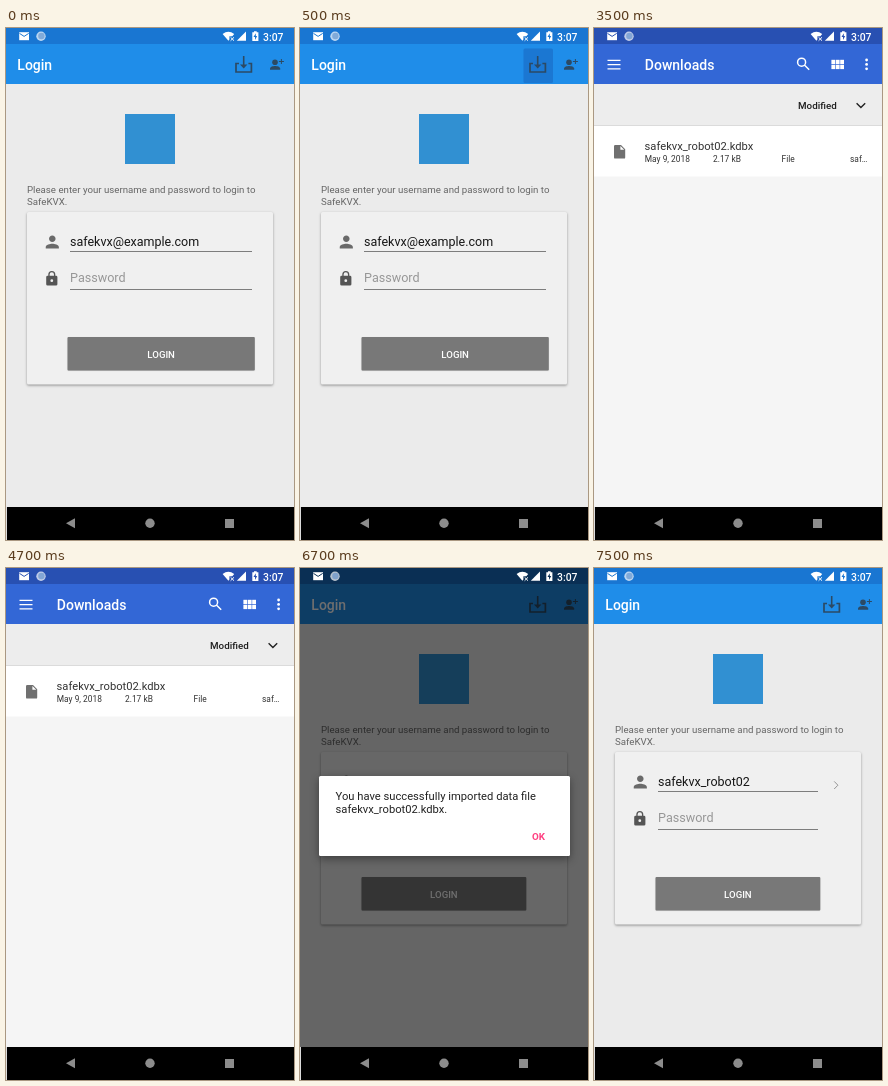
Recreate the animation shown at these times as an HTML page with a canvas. Size 288 by 512 pixels, loop 8 s.

```html
<!DOCTYPE html>
<html lang="en">
<head>
<meta charset="utf-8">
<title>Import a data file</title>
<style>
html, body { margin: 0; width: 100%; height: 100%; overflow: hidden; background: #000; }
canvas { display: block; width: 288px; height: 512px; }
</style>
</head>
<body>
<canvas id="stage"></canvas>
<script>
const W = 288, H = 512, PAGE_END = 479, LOOP = 8000;
const canvas = document.getElementById('stage');
const ctx = canvas.getContext('2d');
const ratio = window.devicePixelRatio || 1;
canvas.width = W * ratio;
canvas.height = H * ratio;

const APP = 'SafeKVX';
const EMAIL = 'safekvx@example.com';
const PROFILE = 'safekvx_robot02';
const FILE = PROFILE + '.kdbx';
const ACTION = '#2c4a64';

const PERSON = 'M12 12c2.21 0 4-1.79 4-4s-1.79-4-4-4-4 1.79-4 4 1.79 4 4 4z' +
  'm0 2c-2.67 0-8 1.34-8 4v2h16v-2c0-2.66-5.33-4-8-4z';
const LOCK = 'M18 8h-1V6a5 5 0 0 0-10 0v2H6a2 2 0 0 0-2 2v10a2 2 0 0 0 2 2h12a2 2 0 0 0 2-2V10a2 2 0 0 0-2-2z' +
  'M12 17a2 2 0 1 1 0-4 2 2 0 0 1 0 4zM15.1 8H8.9V6a3.1 3.1 0 0 1 6.2 0z';

function rect(x, y, w, h, color) {
  ctx.fillStyle = color;
  ctx.fillRect(x, y, w, h);
}

function roundRect(x, y, w, h, r, color) {
  ctx.fillStyle = color;
  ctx.beginPath();
  ctx.roundRect(x, y, w, h, r);
  ctx.fill();
}

function circle(x, y, r, color) {
  ctx.fillStyle = color;
  ctx.beginPath();
  ctx.arc(x, y, r, 0, Math.PI * 2);
  ctx.fill();
}

function fill(path, color) {
  ctx.fillStyle = color;
  ctx.fill(new Path2D(path), 'evenodd');
}

function line(path, color, width) {
  ctx.strokeStyle = color;
  ctx.lineWidth = width;
  ctx.stroke(new Path2D(path));
}

function icon(path, x, y, scale, color) {
  ctx.save();
  ctx.translate(x, y);
  ctx.scale(scale, scale);
  ctx.translate(-12, -12);
  fill(path, color);
  ctx.restore();
}

function text(str, x, y, size, color, weight = 400, align = 'left') {
  ctx.font = `${weight} ${size}px Roboto, sans-serif`;
  ctx.textAlign = align;
  ctx.fillStyle = color;
  ctx.fillText(str, x, y);
}

function shadowed(blur, dy, alpha, draw) {
  ctx.save();
  ctx.shadowColor = `rgba(0,0,0,${alpha})`;
  ctx.shadowBlur = blur * ratio;
  ctx.shadowOffsetY = dy * ratio;
  draw();
  ctx.restore();
}

function statusIcons(barColor) {
  const white = '#fff';
  fill('M13.2 4.2H23V12.2H13.2Z', white);
  line('M13.5 5.4L18.1 8.4L22.7 5.4', barColor, 1);
  circle(35, 8.3, 4.7, 'rgba(255,255,255,.7)');
  circle(35.4, 8, 3.2, 'rgba(90,140,200,.6)');
  fill('M216.6 6Q222.4 1.6 228.2 6L226.3 8.2H223.4V11.6L222.4 12.8Z', white);
  line('M224.6 9.3L228 12.7M228 9.3L224.6 12.7', white, 1);
  fill('M240 3.6V12.7H230.8Z', white);
  fill('M246.3 4.3H248V3.2H250.7V4.3H252.4V13H246.3Z', white);
  fill('M249.8 5.3L247.5 9H249V12L251.2 8.1H249.8Z', barColor);
  text('3:07', 257, 12.5, 10.4, white, 500);
}

function navigation() {
  const gray = '#8c8c8c';
  rect(0, PAGE_END, W, H - PAGE_END, '#000');
  rect(0, PAGE_END, 1, H - PAGE_END, '#dcdcdc');
  fill('M69 490.2V500.2L60 495.2Z', gray);
  circle(144, 495.2, 4.7, gray);
  rect(219, 491, 9, 9, gray);
}

function importIcon() {
  line('M233 35.5H230V44H245.4V35.5H242.4', ACTION, 1.7);
  line('M237.7 28V39', ACTION, 1.6);
  fill('M234 36.6H241.4L237.7 40.6Z', ACTION);
}

function addUserIcon() {
  circle(269, 34.2, 2.8, ACTION);
  fill('M264 41.8V40.6C264 38.8 267 38 269.1 38S274.2 38.8 274.2 40.6V41.8Z', ACTION);
  line('M275.4 31V36M272.9 33.5H277.9', ACTION, 1);
}

function loginScreen({ user, pressed = false, imported = false }) {
  const right = imported ? 224 : 246;
  const buttonRight = imported ? 226.3 : 248.8;

  rect(0, 0, W, PAGE_END, '#ebebeb');
  rect(0, 0, W, 16, '#1976d2');
  rect(0, 16, W, 40, '#1f8de9');
  if (pressed) roundRect(223.5, 20.5, 29.5, 34.5, 1.5, '#1b77d2');
  text('Login', 11.3, 42, 14, '#fff', 500);
  importIcon();
  addUserIcon();

  rect(119, 86, 50, 50, '#3190d2');
  text('Please enter your username and password to login to', 21, 165.2, 9.7, '#666');
  text(APP + '.', 21, 176.7, 9.7, '#666');

  shadowed(2.5, 1, 0.4, () => roundRect(21, 184, 246, 172.5, 1.5, '#f0f0f0'));
  icon(PERSON, 46.3, 214, 0.82, '#6a6a6a');
  icon(LOCK, 45.8, 250.6, 0.7, '#555');
  text(user, 64, 218, 12.5, '#161616');
  text('Password', 64, 254, 12.6, '#979797');
  rect(64, 223, right - 64, 1, '#7d7d7d');
  rect(64, 261, right - 64, 1, '#7d7d7d');
  if (imported) line('M240.2 213.4L243.9 217.2L240.2 221', '#8a8a8a', 0.9);

  shadowed(1, 0.4, 0.15, () => roundRect(61.5, 309, buttonRight - 61.5, 33.5, 1, '#787878'));
  text('LOGIN', (61.5 + buttonRight) / 2, 329.5, 9.6, '#fff', 500, 'center');
  statusIcons('#1976d2');
}

function downloadsScreen() {
  const white = '#fff';
  rect(0, 0, W, PAGE_END, '#f5f5f5');
  rect(0, 0, W, 16, '#2850b2');
  rect(0, 16, W, 40, '#3367d6');
  line('M13.5 32.4H26.5M13.5 36.6H26.5M13.5 40.8H26.5', white, 1.3);
  text('Downloads', 50.8, 42, 14, white, 500);
  line('M211.6 34.2A4 4 0 1 1 203.6 34.2A4 4 0 1 1 211.6 34.2M210.4 37L215.2 41.8', white, 1.5);
  for (let i = 0; i < 6; i++) {
    rect(237.4 + (i % 3) * 4.4, 31.8 + Math.floor(i / 3) * 5, 3.8, 4.3, white);
  }
  for (let i = 0; i < 3; i++) circle(272.6, 32 + i * 4.4, 1.4, white);

  rect(0, 56, W, 41.5, '#ededed');
  rect(0, 97, W, 0.8, '#d6d6d6');
  text('Modified', 204, 81, 9.8, '#202020', 500);
  line('M262.6 75.2L266.9 79.5L271.2 75.2', '#222', 1.4);

  rect(0, 98, W, 50.5, white);
  fill('M21.2 117H27L31.2 121.2V129.4Q31.2 130.6 30 130.6H21.2Q20 130.6 20 129.4V118.2Q20 117 21.2 117ZM26.4 118V121.8H30.2Z', '#707070');
  text(FILE, 50.6, 122, 11.2, '#333');
  text('May 9, 2018', 50.8, 134.4, 8.4, '#333');
  text('2.17 kB', 119, 134.4, 8.4, '#333');
  text('File', 187.6, 134.4, 8.4, '#333');
  text(FILE.slice(0, 3) + '…', 256, 134.4, 8.4, '#333');
  statusIcons('#2850b2');
}

function importedDialog() {
  loginScreen({ user: PROFILE, imported: true });
  rect(0, 0, W, PAGE_END, 'rgba(0,0,0,.57)');
  rect(0, 0, W, 16, '#0a2f54');
  statusIcons('#0a2f54');
  shadowed(8, 3, 0.4, () => roundRect(19, 208, 251, 80, 1.5, '#fff'));
  text('You have successfully imported data file', 35.6, 232, 11.2, '#222');
  text(FILE + '.', 35.6, 245, 11.2, '#222');
  text('OK', 232, 271.7, 9.8, '#ff4081', 700);
}

const scenes = [
  { until: 500, draw: () => loginScreen({ user: EMAIL }) },
  { until: 3500, draw: () => loginScreen({ user: EMAIL, pressed: true }) },
  { until: 5500, draw: downloadsScreen },
  { until: 7500, draw: importedDialog },
  { until: LOOP, draw: () => loginScreen({ user: PROFILE, imported: true }) }
];

const start = performance.now();

function frame() {
  const t = (performance.now() - start) % LOOP;
  ctx.setTransform(ratio, 0, 0, ratio, 0, 0);
  scenes.find(scene => t < scene.until).draw();
  navigation();
  requestAnimationFrame(frame);
}

frame();
</script>
</body>
</html>
```
